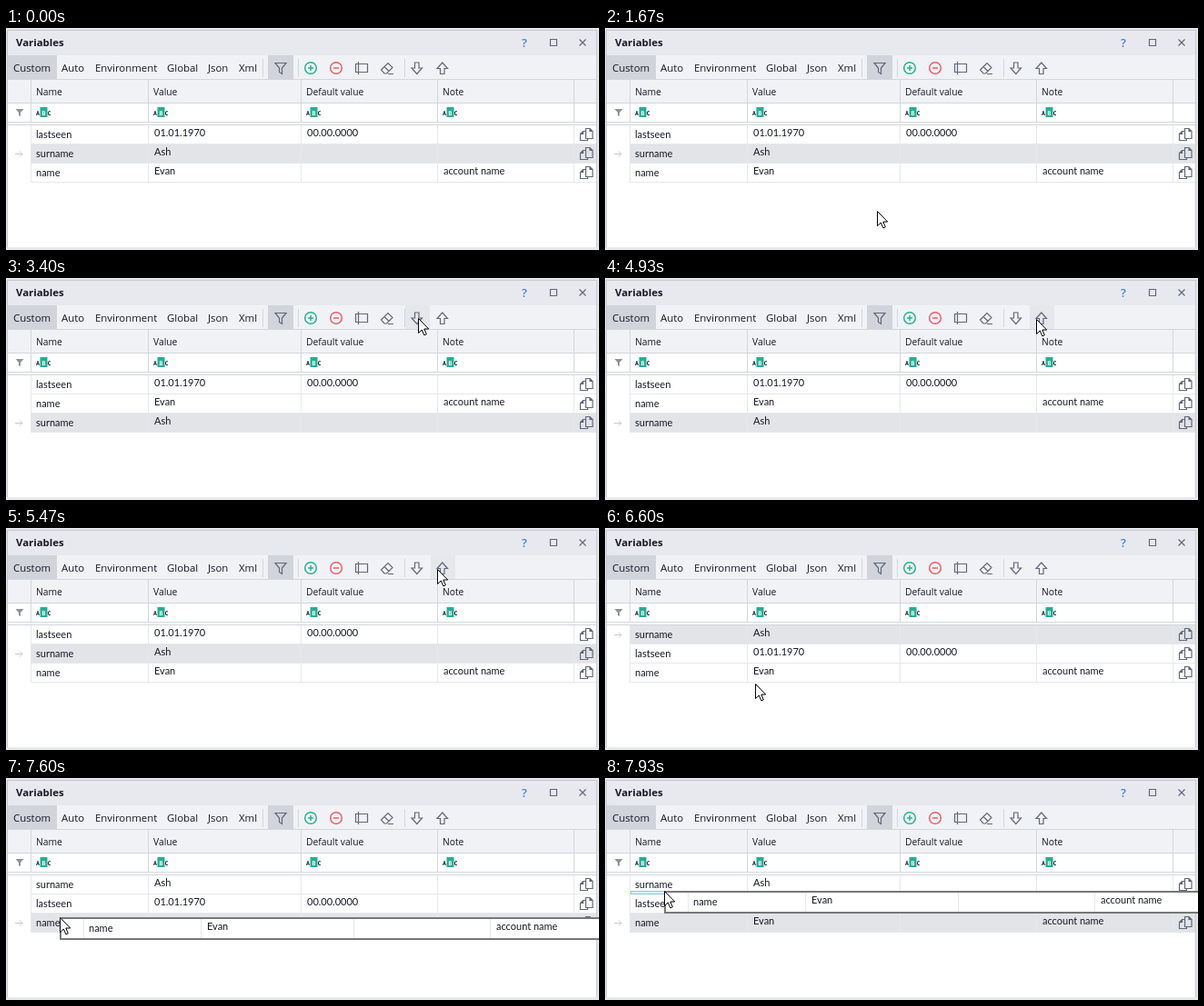
An HTML page for the animation above (8 s loop, 652 by 244 pixels).

```html
<!DOCTYPE html>
<html lang="en">
<head>
<meta charset="utf-8">
<title>Variables panel</title>
<style>
  html, body { margin: 0; width: 100%; height: 100%; overflow: hidden; background: #e7e8ec; }
  svg { display: block; }
  text { fill: #161826; font-family: "Open Sans", "Noto Sans", sans-serif; white-space: pre; }
  .title { font-size: 11.4px; font-weight: 700; }
  .tab { font-size: 11.4px; }
  .head { font-size: 10.3px; }
  .cell { font: 11px Lato, "Liberation Sans", sans-serif; }
  .abc { font: 700 6.5px "DejaVu Sans Mono", monospace; text-anchor: middle; }
  .icon { fill: none; stroke: #62687a; stroke-width: 1.2; }
  .rule { stroke: #d3d6dd; }
  .soft { stroke: #e6e8ec; }
</style>
</head>
<body>
<svg id="stage" width="652" height="244" viewBox="0 0 652 244"></svg>
<script>
const LOOP = 8000, TICK = 200 / 3;
const ROW_TOP = 107, ROW_H = 21;
const cols = [27, 156, 324, 474, 624];
const heads = ["Name", "Value", "Default value", "Note"];
const tabs = [[8, "Custom"], [61, "Auto"], [98, "Environment"], [177, "Global"], [222, "Json"], [256, "Xml"]];
const data = {
  lastseen: ["01.01.1970", "00.00.0000", ""],
  surname: ["Ash", "", ""],
  name: ["Evan", "", "account name"]
};

const rect = (x, y, w, h, fill, extra = "") =>
  `<rect x="${x}" y="${y}" width="${w}" height="${h}" fill="${fill}" ${extra}/>`;
const text = (x, y, cls, s, extra = "") => `<text x="${x}" y="${y}" class="${cls}" ${extra}>${s}</text>`;
const path = (d, extra = 'class="icon"') => `<path d="${d}" ${extra}/>`;
const vline = (x, y1, y2, cls = "rule") => path(`M${x + .5} ${y1}V${y2}`, `class="${cls}"`);
const hline = (y, x1, x2, cls = "rule") => path(`M${x1} ${y + .5}H${x2}`, `class="${cls}"`);
const funnel = (x, y, fill) =>
  path(`M${x - 4.5} ${y - 4}h9l-3.5 4v4l-2 -1v-3z`, `fill="${fill}"`);

// Row contents relative to the row's top edge
function cells(name) {
  const values = data[name].map((s, i) => text(cols[i + 1] + 7, 12, "cell", s));
  return text(33, 14, "cell", name) + values.join("");
}

function row(name) {
  return `<g id="${name}">` +
    `<g class="mark">${rect(27, 0, 622, 20, "#e2e4e8")}` +
    path("M10 10.5H18M15 7.5l3 3l-3 3", 'fill="none" stroke="#c6c9cf"') + "</g>" +
    hline(20, 27, 649, "soft") + cols.map(x => vline(x, 0, 21, "soft")).join("") + cells(name) +
    path("M637.5 3.5h4.500l3 3v8h-7.500zM642 3.500v3h3M637.5 6.500h-3l-3 3v7h8v-2M634.500 6.500v3h-3") + "</g>";
}

function abc(x) {
  return text(x + 2, 95.500, "abc", "A") + rect(x + 4.500, 87, 8, 11, "#26ad94") +
    text(x + 8.500, 95.500, "abc", "B", 'style="fill:#fff"') + text(x + 14.500, 95.500, "abc", "C");
}

function frame() {
  return rect(1.5, 2.5, 648, 238, "#f1f2f6", 'stroke="#c4c7ce"') + rect(2, 3, 647, 27, "#e8e9ee") +
    text(11, 20, "title", "Variables") +
    text(567, 20.500, "title", "?", 'style="fill:#3f83e6;font-size:13px;font-weight:600"') +
    path("M598.500 12.500h7v7h-7z") + path("M630.500 12.500l7 7m0 -7l-7 7");
}

function toolbar() {
  return rect(2, 30, 54, 27, "#d1d4db") + rect(288, 30, 28, 27, "#d1d4db") +
    rect(439, 30, 27, 27, "#e6e7eb", 'id="down"') + rect(467, 30, 27, 27, "#e6e7eb", 'id="up"') +
    tabs.map(([x, s]) => text(x, 48, "tab", s)).join("") +
    [282, 321, 438].map(x => vline(x, 34, 54)).join("") +
    path("M296 38.500h12l-4.500 5.500v6.500l-3 -2v-4.500z") +
    `<g fill="none" stroke-width="1.500"><g stroke="#28b193"><circle cx="335" cy="44" r="6.3"/>` +
    `<path d="M332 44h6M335 41v6"/></g><g stroke="#ed5e66"><circle cx="363" cy="44" r="6.3"/>` +
    `<path d="M360 44h6"/></g></g>` +
    path("M387.500 37v14M384.500 39.500h13v9h-13z") +
    path("M412.500 46l7.500 -7.500l5 5l-6.500 6.500h-2.500zM416 42.500l5 5M420 50.500h6") +
    path("M449.500 38h4.500v6h3.500l-5.700 6.500l-5.800 -6.500h3.500z") +
    path("M477.500 50.500h4.500v-6h3.500l-5.700 -6.500l-5.800 6.500h3.500z");
}

function grid() {
  return rect(2, 83, 647, 158, "#fff") + hline(56, 2, 649) + hline(82, 2, 649) +
    cols.map(x => vline(x, 57, 104)).join("") +
    heads.map((s, i) => {
      const x = cols[i];
      const hover = rect(cols[i + 1] - 21, 57, 20, 25, "#e4e6ea") + funnel(cols[i + 1] - 11, 70, "#22253a");
      return `<g class="hover">${hover}</g>` + text(x + 6, 74, "head", s) + abc(x + 6);
    }).join("") +
    funnel(15, 93, "#8e929c") + hline(103, 2, 649) + hline(106, 2, 649) +
    vline(27, 107, 170, "soft") + Object.keys(data).map(row).join("");
}

function overlay() {
  return rect(28.5, 124.5, 596, 3, "#d9f1fa", 'id="drop" stroke="#7fcbe4"') +
    `<g id="ghost">${rect(1, 1, 660, 23, "#fff", 'stroke="#777" stroke-width="2"')}` +
    `<g transform="translate(-1 2)">${cols.map(x => vline(x, 0, 21, "soft")).join("")}${cells("name")}</g></g>` +
    path("M.5 .5V16.500L4.300 13L6.800 18.800L9.300 17.800L6.800 12H11.700Z",
      'id="cursor" fill="#fff" stroke="#000" stroke-linejoin="round"');
}

const stage = document.getElementById("stage");
stage.innerHTML = frame() + toolbar() + grid() + overlay();
const $ = id => document.getElementById(id);
const hovers = [...document.querySelectorAll(".hover")];

// Pointer way points: tick, x, y
const way = [
  [21, 394, 244], [30, 167, 142], [34, 208, 129], [41, 457, 70], [46, 453, 44],
  [59, 453, 44], [63, 474, 45], [90, 474, 45], [99, 165, 171], [102, 162, 166],
  [107, 47, 158], [108, 47, 158], [114, 59, 153], [119, 65, 124]
];
// Row order from a tick on
const orders = [
  [0, "lastseen surname name"], [51, "lastseen name surname"],
  [82, "lastseen surname name"], [91, "surname lastseen name"]
].map(([k, s]) => [k, s.split(" ")]);
const presses = { down: [50], up: [81, 90] };

function pointer(k) {
  const i = way.findIndex(p => p[0] >= k);
  if (i < 1) return way[i < 0 ? way.length - 1 : 0].slice(1);
  const [a, b] = [way[i - 1], way[i]];
  const u = (k - a[0]) / (b[0] - a[0]), e = u * u * (3 - 2 * u);
  return [1, 2].map(j => Math.round(a[j] + (b[j] - a[j]) * e));
}

const show = (el, on) => { el.style.display = on ? "" : "none"; };
const place = (el, x, y) => el.setAttribute("transform", `translate(${x} ${y})`);

function draw(t) {
  const k = Math.floor((t + 5) / TICK);
  const [x, y] = pointer(k);
  const live = k >= 22, drag = k >= 109;

  const order = orders.filter(o => o[0] <= k).pop()[1];
  const picked = k >= 107 ? "name" : "surname";
  order.forEach((name, i) => {
    place($(name), 0, ROW_TOP + i * ROW_H);
    show($(name).querySelector(".mark"), name === picked);
  });

  hovers.forEach((el, i) => show(el, live && y >= 57 && y < 82 && x >= cols[i] && x < cols[i + 1]));
  for (const id in presses) {
    const left = id === "down" ? 439 : 467;
    show($(id), live && y >= 30 && y < 57 && x >= left && x < left + 27);
    $(id).setAttribute("fill", presses[id].includes(k) ? "#d1d4db" : "#e6e7eb");
  }

  show($("ghost"), drag);
  show($("drop"), drag && y < 138);
  place($("ghost"), x, y);
  show($("cursor"), live);
  place($("cursor"), x, y);
}

const start = performance.now();
function loop() {
  draw((performance.now() - start) % LOOP);
  requestAnimationFrame(loop);
}
loop();
</script>
</body>
</html>
```
